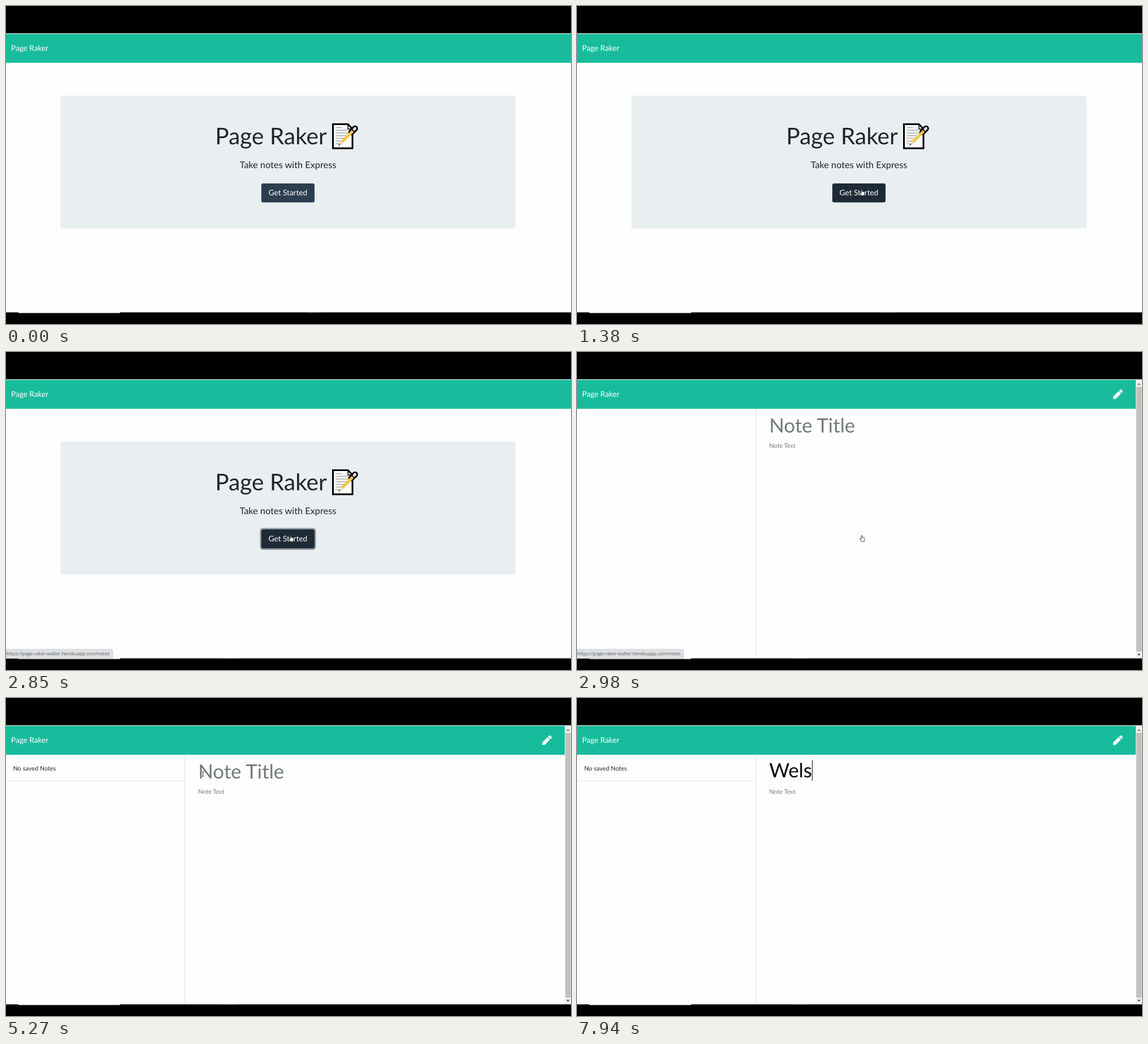
Animation of 998x561 px, one loop 8000 ms. Source, as an HTML page:

```html
<!DOCTYPE html>
<html lang="en">
<head>
<meta charset="utf-8">
<title>Page Raker</title>
<style>
  html, body { margin: 0; width: 100%; height: 100%; overflow: hidden; background: #000; }
  svg { position: absolute; left: 0; top: 0; }
  text, .typed { font-family: Lato, sans-serif; text-rendering: geometricPrecision; }
  .nav { font-size: 13.57px; fill: #fff; }
  .small { font-size: 10.86px; }
  .title { font-size: 34.75px; }
  .muted { fill: #727a7a; }
  .ink { fill: #212529; }

  /* One 8 s clock; stepped parts hold each state until the next keyframe. */
  .timed { animation: 8s step-end infinite; }
  .smooth { animation-timing-function: linear; }
  .home { animation-name: home; }
  .notes { opacity: 0; animation-name: notes; }
  .saved { opacity: 0; animation-name: saved; }
  .button { fill: #2c3e50; animation-name: hover; }
  .ring { opacity: 0; animation-name: ring; }
  .status { opacity: 0; animation-name: status; }
  .tab { animation-name: tab; }
  .arrow { opacity: 0; animation-name: arrow; }
  .hand { opacity: 0; animation-name: hand; }
  .beam { opacity: 0; animation-name: beam; }
  .hint { animation-name: hint; }
  .caret { opacity: 0; animation-name: caret; }
  .approach { animation: approach 8s ease-out infinite; }

  @keyframes home { 0% { opacity: 1 } 37.2%, 100% { opacity: 0 } }
  @keyframes notes { 0% { opacity: 0 } 37.2%, 100% { opacity: 1 } }
  @keyframes saved { 0% { opacity: 0 } 40.5%, 100% { opacity: 1 } }
  @keyframes hover { 0%, 12.5% { fill: #2c3e50 } 14.4%, 100% { fill: #1e2b37 } }
  @keyframes ring { 0% { opacity: 0 } 34%, 100% { opacity: 1 } }
  @keyframes status {
    0%, 19.5% { opacity: 0 } 21.5%, 42.8% { opacity: 1 } 44.8%, 100% { opacity: 0 }
  }
  @keyframes tab { 0% { transform: none } 34%, 100% { transform: translateX(-152.5px) } }
  @keyframes approach {
    0%, 6.7% { transform: translate(64px, 212px) }
    12.5% { transform: translate(12px, 14px) }
    16.3%, 100% { transform: none }
  }
  @keyframes arrow { 0% { opacity: 0 } 6.7% { opacity: 1 } 12.5%, 100% { opacity: 0 } }
  @keyframes hand { 0% { opacity: 0 } 12.5% { opacity: 1 } 43%, 100% { opacity: 0 } }
  @keyframes beam {
    0% { opacity: 0 }
    43% { opacity: 1; transform: translate(491px, 312px) }
    44.6% { opacity: 1; transform: translate(489px, 309px) }
    47.1% { opacity: 1; transform: translate(420px, 237px) }
    48.7% { opacity: 1; transform: translate(375px, 196px) }
    51.2% { opacity: 1; transform: translate(367px, 195px) }
    53.7% { opacity: 1; transform: translate(350px, 191px) }
    56.2% { opacity: 1; transform: translate(347px, 170px) }
    57.1% { opacity: 1; transform: translate(346px, 156px) }
    58.9% { opacity: 1; transform: translate(345px, 146px) }
    60.6% { opacity: 1; transform: translate(346px, 139px) }
    63.2% { opacity: 1; transform: translate(348px, 134px) }
    66.3% { opacity: 1; transform: translate(349px, 131px) }
    73.6%, 100% { opacity: 0; transform: translate(349px, 131px) }
  }
  @keyframes hint { 0% { opacity: 1 } 90.2%, 100% { opacity: 0 } }
  @keyframes caret {
    0% { opacity: 0 } 66.3% { opacity: 1 } 73% { opacity: 0 }
    79.6% { opacity: 1 } 86.2%, 100% { opacity: 0 }
  }

  .typed {
    position: absolute; left: 339.5px; top: 110px; height: 36px;
    font-size: 34.75px; line-height: 36px; color: #080808;
    border-right: 1.3px solid #000; opacity: 0;
  }
  .key1 { animation-name: key1; }
  .key2 { animation-name: key2; }
  .key3 { animation-name: key3; }
  .key4 { animation-name: key4; }
  @keyframes key1 { 0% { opacity: 0 } 90.2% { opacity: 1 } 95.1%, 100% { opacity: 0 } }
  @keyframes key2 { 0% { opacity: 0 } 95.1% { opacity: 1 } 97.6%, 100% { opacity: 0 } }
  @keyframes key3 { 0% { opacity: 0 } 97.6% { opacity: 1 } 99.2%, 100% { opacity: 0 } }
  @keyframes key4 { 0% { opacity: 0 } 99.2%, 100% { opacity: 1 } }
</style>
</head>
<body>
<svg width="998" height="561" viewBox="0 0 998 561">
  <rect width="998" height="561"/>
  <rect y="48" width="998" height="2" fill="#d5dcdb"/>
  <rect y="100" width="998" height="440" fill="#fefefe"/>
  <rect y="49.3" width="998" height="50.9" fill="#18bc9c"/>
  <rect y="540" width="998" height=".7" fill="#aaa"/>
  <rect x="22" y="540" width="179.5" height="1.7" fill="#f4f4f4"/>
  <rect class="timed tab" x="534" y="540.3" width="25.5" height="1.2" fill="#666"/>
  <text class="nav" x="9" y="79.3">Page Raker</text>

  <g class="timed home">
    <rect x="96" y="158" width="804" height="234.5" rx="3.5" fill="#e9eef0"/>
    <text class="ink" x="369.5" y="244.3" font-size="40.55">Page Raker</text>
    <g stroke-linecap="round" stroke-linejoin="round">
      <path d="M577.5 208.5H604L612 217V251H577.5Z" fill="#fafafa" stroke="#000" stroke-width="3" stroke-linejoin="miter"/>
      <path d="M604 209V217H612" fill="none" stroke="#000" stroke-width="1.5"/>
      <path d="M583 214.5H593M583 219.3H603M583 224H606M583 228.8H604M583 233.5H599M583 238.3H595M583 243H590" stroke="#aaa" stroke-width="1.5"/>
      <path d="M610 222.5L616.5 216" stroke="#000" stroke-width="10.5"/>
      <path d="M615 217.5L616.5 216" stroke="#ddd" stroke-width="5"/>
      <path d="M588 245.5L590 238.5L595 243.5Z" fill="#e9d4ae"/>
      <path d="M593.5 240L612.5 220.5" stroke="#f6c644" stroke-width="5" stroke-linecap="butt"/>
      <path d="M588 245.5L589.5 244" stroke="#333" stroke-width="1.5"/>
    </g>
    <text class="ink" x="498" y="285.7" font-size="16.3" text-anchor="middle">Take notes with Express</text>
    <rect class="timed ring" x="449.8" y="311.8" width="96.4" height="35.9" rx="4" fill="none" stroke="#8b979f" stroke-width="2.4"/>
    <rect class="timed smooth button" x="451" y="313" width="94" height="33.5" rx="3.3"/>
    <text class="nav" x="498" y="334" text-anchor="middle">Get Started</text>
  </g>

  <g class="timed notes">
    <path d="M316 100V540" stroke="#ccc" stroke-dasharray="1.5 .8"/>
    <g class="timed saved">
      <text class="small ink" x="12.7" y="127.6">No saved Notes</text>
      <path d="M0 146H315.5" stroke="#e4e4e4"/>
    </g>
    <text class="title muted timed hint" x="339.5" y="141.5">Note Title</text>
    <text class="small muted" x="339.5" y="169">Note Text</text>
    <rect class="timed caret" x="339" y="110" width="1.4" height="36"/>
    <path fill="#fff" d="M956.7 69.1L960.9 73.3L951.7 82.6L947.9 83Q946.9 83 947 82L947.4 78.3ZM957.4 68.3L959.3 66.5Q960.5 65.5 961.6 66.5L963.6 68.5Q964.5 69.6 963.6 70.7L961.7 72.6Z"/>
    <rect x="987" y="49.3" width="11" height="490.7" fill="#f1f1f1"/>
    <rect x="988" y="61.5" width="9.5" height="467" fill="#c1c1c1"/>
    <path d="M989.6 58L992.6 54.8L995.6 58Z" fill="#777"/>
    <path d="M989.6 532.6L992.6 535.8L995.6 532.6Z" fill="#444"/>
  </g>

  <g class="timed smooth status">
    <path d="M0 524.3H186Q188.5 524.3 188.5 527V540.5H0Z" fill="#dee0e2" stroke="#cbcdd0" stroke-width=".7"/>
    <text x=".7" y="535.4" font-size="8.2" fill="#55595e" style="font-family:'Open Sans',sans-serif">https://page-raker-walter.herokuapp.com/notes</text>
  </g>

  <g class="approach" fill="#fff" stroke="#222" stroke-width=".8" stroke-linejoin="round">
    <path class="timed arrow" d="M502 323.5V335L504.6 332.5L506.4 336.4L508 335.6L506.3 331.9H510Z"/>
    <path class="timed hand" d="M502.1 330.2V324Q502.9 322.7 503.7 324V327.1L507 327.8Q508.3 328.1 508.2 329.5L507.3 334.5H502.4L499.6 330.5Q499.2 329.2 500.6 329.2Z"/>
  </g>
  <path class="timed beam" d="M-2-4.2H-.6L0-3.7L.6-4.2H2M0-3.7V3.7M-2 4.2H-.6L0 3.7L.6 4.2H2" fill="none" stroke="#333"/>
</svg>
<div class="timed typed key1">W</div>
<div class="timed typed key2">We</div>
<div class="timed typed key3">Wel</div>
<div class="timed typed key4">Wels</div>
</body>
</html>
```
